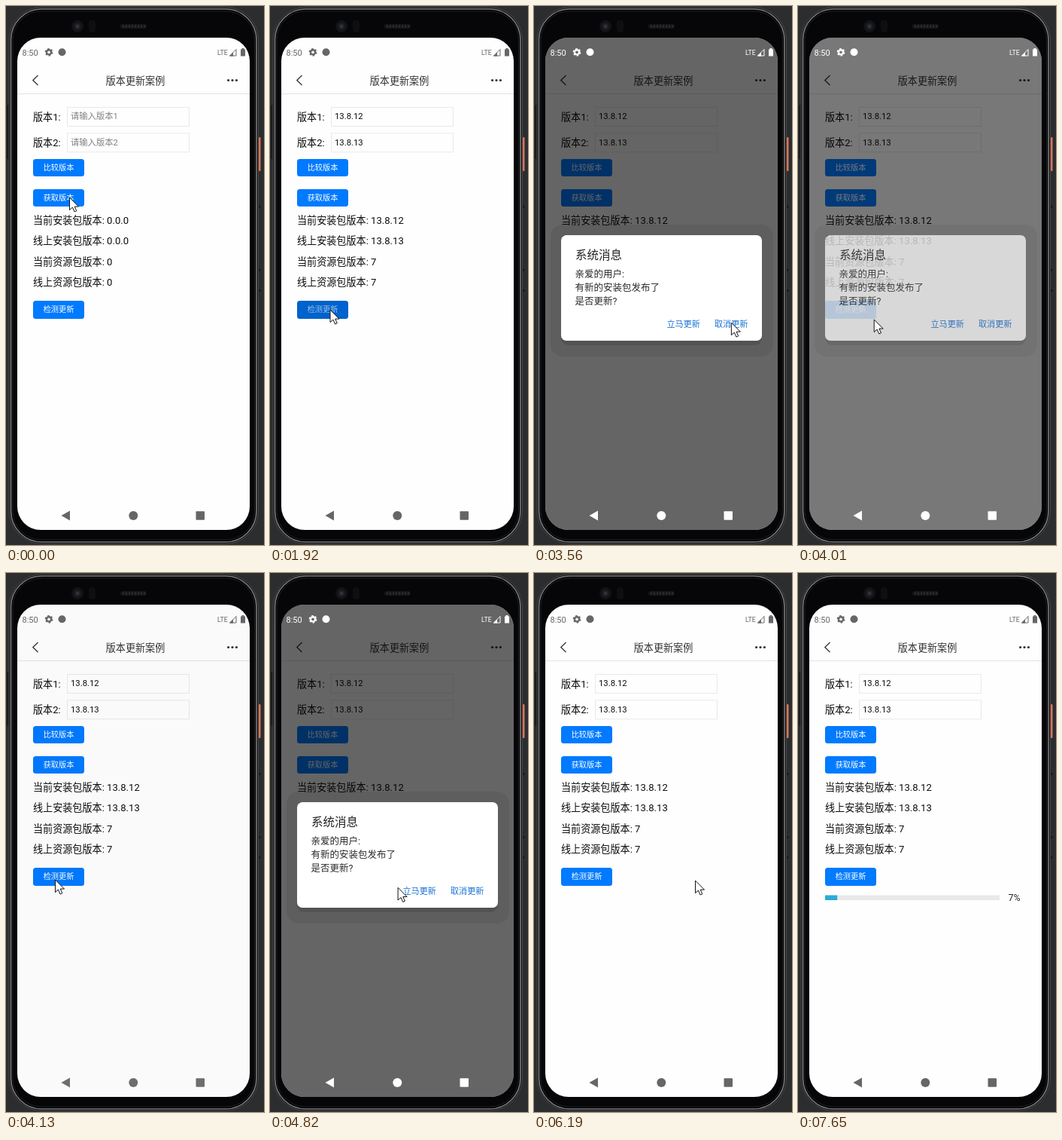
Write an HTML page that moves like this. It is 343 by 715 pixels and loops after 8000 ms.

```html
<!DOCTYPE html>
<html lang="zh-CN">
<head>
<meta charset="utf-8">
<style>
html, body { margin: 0; width: 100%; height: 100%; overflow: hidden; background: #2c2d2f; }
svg { display: block; width: 343px; height: 715px; font-family: Roboto, 'Noto Sans CJK SC', 'Noto Sans CJK', sans-serif; }
</style>
</head>
<body>
<svg id="stage" viewBox="0 0 343 715"></svg>
<script>
const LOOP = 8000;
const clamp = v => Math.max(0, Math.min(1, v));
const smooth = v => (v = clamp(v), v * v * (3 - 2 * v));
const mix = (a, b, k) => a + (b - a) * k;
const gray = v => `rgb(${v},${v},${v})`;

// Text placed by the vertical centre of its line
const text = (x, cy, size, str, fill = '#0c0c0c', extra = '') =>
  `<text x="${x}" y="${cy + size * 0.37}" font-size="${size}" fill="${fill}" ${extra}>${str}</text>`;
const rect = (x, y, w, h, fill, extra = '') =>
  `<rect x="${x}" y="${y}" width="${w}" height="${h}" fill="${fill}" ${extra}/>`;
const button = (id, y, h, label) => `<g id="${id}">${rect(36, y, 68, h, '#007aff', 'rx="3.5"')}
  ${text(70, y + h / 2 - 0.3, 10.2, label, '#fff', 'text-anchor="middle"')}</g>`;
const field = (id, y, label) => text(36, y + 13, 13.1, label + ':') +
  rect(81.5, y + 0.5, 162, 25, 'none', 'stroke="#e9e9e9"') +
  text(86, y + 12.2, 11.3, '', '#808080', `id="${id}"`);

const phone = `
  ${rect(0, 0, 343, 715, '#2c2d2f')}
  ${rect(1, 131, 4, 72, '#1b1c1e', 'rx="1.5"')}
  ${rect(336, 174, 2.5, 45, '#d9745a', 'rx="1"')}
  ${[265, 349, 376].map(y => rect(336, y, 2.5, 3, '#1a1b1d')).join('')}
  ${rect(4, 1.5, 331.5, 712, '#161618', 'rx="44" stroke="#48494b"')}
  ${rect(6.5, 4, 326.5, 707, '#060608', 'rx="41" stroke="#77787a" stroke-width="1.6"')}
  ${rect(9, 7, 321.5, 701, '#060608', 'rx="38" stroke="#1e1f21"')}
  <circle cx="95" cy="27" r="8" fill="#121316"/><circle cx="95" cy="27" r="4.5" fill="#1e2023"/>
  <circle cx="95" cy="27" r="2" fill="#34373c"/>
  ${rect(110, 19, 9, 16, '#0e0f11', 'rx="4"')}
  ${rect(152, 24, 35, 6, '#151618', 'rx="3"')}
  <path d="M155 27H185" stroke="#2c2d2f" stroke-width="3" stroke-dasharray="2 2"/>`;

const page = `
  ${rect(15, 42, 309, 653, '#fefefe')}
  <path d="M42.5 92L35.8 98.5L42.5 105" fill="none" stroke="#333" stroke-width="1.3"/>
  ${text(172, 99.2, 13.1, '版本更新案例', '#333', 'text-anchor="middle"')}
  ${[295.6, 301, 306.4].map(x => `<circle cx="${x}" cy="98.5" r="1.6" fill="#333"/>`).join('')}
  ${rect(15, 116, 309, 1, '#e2e2e2')}
  ${field('in1', 134, '版本1')}${field('in2', 168.3, '版本2')}
  ${button('compare', 203, 23, '比较版本')}
  ${button('fetch', 243, 23, '获取版本')}
  ${[0, 1, 2, 3].map(i => text(36, 284.5 + 27.1 * i, 13.1, '', '#0c0c0c', `id="row${i}"`)).join('')}
  ${button('check', 391, 24, '检测更新')}
  <g id="progress">
    ${rect(36, 427.5, 232, 6.5, '#e9e9e9')}
    ${rect(36, 427.5, 0, 6.5, '#2cabd8', 'id="fill"')}
    ${text(279.5, 430.8, 12.4, '', '#222', 'id="percent"')}
  </g>`;

const status = `
  ${text(21.5, 62, 11, '8:50', 'currentColor')}
  <circle cx="57" cy="61.3" r="3.1" fill="none" stroke="currentColor" stroke-width="2.4"/>
  <circle cx="57" cy="61.3" r="4.6" fill="none" stroke="currentColor" stroke-width="1.5" stroke-dasharray="2.41 2.41"/>
  <circle cx="74.5" cy="61.3" r="5" fill="currentColor"/>
  ${text(281, 62, 8.8, 'LTE', 'currentColor')}
  <path d="M297.5 66L306 57.5V66Z" fill="none" stroke="currentColor"/>
  <path d="M297 66.4L302 61.5V66.4Z" fill="currentColor"/>
  <path d="M312 57.5H313.5V56H316.5V57.5H318V66.5H312Z" fill="currentColor"/>`;

const nav = `
  <path d="M73.5 676L85 669.5V682.5Z" fill="currentColor"/>
  <circle cx="169.3" cy="676" r="6" fill="currentColor"/>
  ${rect(252.5, 670.3, 11.5, 11.5, 'currentColor', 'rx="1"')}`;

const dialog = `
  <rect id="shadow" rx="16" fill="#000" opacity=".07"/>
  ${rect(36, 308, 267, 142, '#000', 'rx="9" opacity=".12"')}
  ${rect(36, 304, 267, 140, '#fff', 'rx="7"')}
  ${text(55, 330, 15.5, '系统消息', '#222')}
  ${['亲爱的用户:', '有新的安装包发布了', '是否更新?'].map((s, i) => text(54.5, 355 + 18.2 * i, 12.5, s, '#2b2b2b')).join('')}
  ${text(176.5, 422, 11.1, '立马更新', '#1a73d8')}
  ${text(240, 422, 11.1, '取消更新', '#1a73d8')}`;

document.getElementById('stage').innerHTML = `
  <defs><clipPath id="screen"><rect x="15" y="42" width="309" height="653" rx="31"/></clipPath></defs>
  ${phone}
  <g clip-path="url(#screen)">
    ${page}
    ${rect(15, 42, 309, 653, '#000', 'id="dim"')}
    <g id="status">${status}</g><g id="nav">${nav}</g>
    <g id="dialog">${dialog}</g>
  </g>
  <path id="cursor" d="M.5 0V16.6L4.4 13.1L7.1 19L9.8 17.8L7.2 12.1H12.5Z" fill="#fff" stroke="#111" stroke-linejoin="round"/>`;

const $ = {};
document.querySelectorAll('[id]').forEach(el => $[el.id] = el);
const set = (el, attrs) => { for (const k in attrs) el.setAttribute(k, attrs[k]); };

// Cursor path: time, x, y
const path = [
  [1010, 84, 254], [1160, 79, 275], [1370, 73, 330], [1560, 75, 385], [1700, 79.5, 403],
  [2320, 79.5, 403], [2440, 110, 407], [2680, 215, 419], [2820, 252, 421], [2940, 262, 420],
  [3560, 262, 420], [3700, 245, 421], [3860, 176, 420], [4010, 101, 416], [4130, 65, 407], [4240, 66, 404],
  [4600, 66, 404], [4690, 100, 410], [4850, 185, 419], [4990, 214, 419],
  [6110, 214, 419], [6190, 214, 408], [6340, 214, 408], [6400, 210, 406],
  [6810, 210, 406], [6950, 204, 470], [7100, 196, 566], [7330, 196, 566], [7560, 188, 730]
];

function cursorAt(t) {
  const i = path.findIndex(p => p[0] > t);
  if (i < 0) return path[path.length - 1].slice(1);
  if (!i) return path[0].slice(1);
  const [a, b] = [path[i - 1], path[i]], k = (t - a[0]) / (b[0] - a[0]);
  return [mix(a[1], b[1], k), mix(a[2], b[2], k)];
}

// Each dialog: opening time, time the closing shows, time the closing began
const dialogs = [[2170, 3972, 3972], [4520, 5390, 5333]];

function dialogAt(t) {
  const state = { dim: 0, alpha: 0, status: 0, nav: 0, grow: 1 };
  for (const [open, close, began] of dialogs) {
    if (t >= open && t < close) {
      const k = smooth((t - open + 30) / 110);
      return { dim: 0.6 * k, alpha: k, status: k, nav: k, grow: clamp((t - open - 80) / 200) };
    }
    const u = t - began;
    if (t >= close && u < 250) {
      state.dim = 0.6 * (1 - smooth(u / 175));
      state.alpha = 1 - clamp(u / 95) ** 1.4;
      state.status = 1 - clamp((u - 50) / 100);
      state.nav = 1 - clamp((u - 100) / 62);
    }
  }
  return state;
}

function press(el, down) {
  set(el.children[0], { fill: down ? '#0062cc' : '#007aff' });
  set(el.children[1], { 'fill-opacity': down ? 0.6 : 1 });
}

function draw(t) {
  const known = t >= 770;
  ['13.8.12', '13.8.13'].forEach((v, i) => {
    const el = $['in' + (i + 1)];
    el.textContent = known ? v : '请输入版本' + (i + 1);
    set(el, { fill: known ? '#0c0c0c' : '#808080' });
  });
  const values = known ? ['13.8.12', '13.8.13', 7, 7] : ['0.0.0', '0.0.0', 0, 0];
  ['当前安装包', '线上安装包', '当前资源包', '线上资源包'].forEach((s, i) =>
    $['row' + i].textContent = `${s}版本: ${values[i]}`);
  press($.fetch, t >= 590 && t < 740);
  press($.check, t >= 1920 && t < 2170 || t >= 4270 && t < 4520);

  const d = dialogAt(t), g = d.grow;
  set($.dim, { opacity: d.dim });
  set($.dialog, { opacity: d.alpha });
  const x = mix(33, 22, g), y = mix(304, 290, g);
  set($.shadow, { x, y, width: mix(308, 318, g) - x, height: mix(456, 465, g) - y });
  set($.status, { color: gray(Math.round(mix(102, 255, d.status))) });
  set($.nav, { color: gray(Math.round(mix(102, 255, d.nav))) });

  const k = clamp((t - 7350) / 290);
  set($.progress, { visibility: t >= 6370 ? 'visible' : 'hidden' });
  set($.fill, { width: t < 6400 ? 0 : mix(4, 16.2, k) });
  $.percent.textContent = t < 7350 ? '0' : Math.round(mix(2, 7, k)) + '%';

  set($.cursor, { transform: `translate(${cursorAt(t)})` });
}

function frame() {
  draw(performance.now() % LOOP);
  requestAnimationFrame(frame);
}
frame();
</script>
</body>
</html>
```
